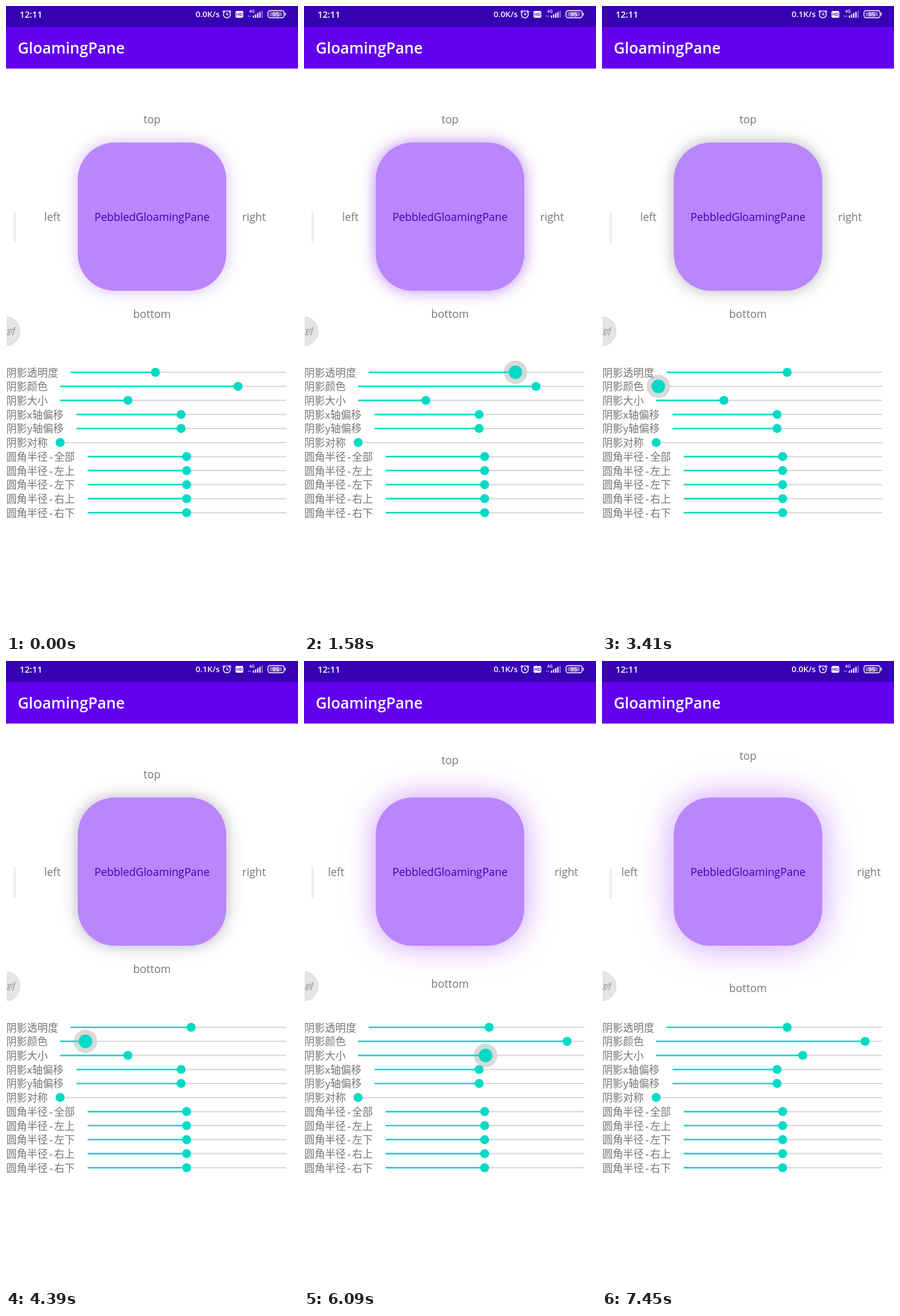
An HTML page for the animation above (8 s loop, 472x1015 px).

```html
<!DOCTYPE html>
<html lang="zh">
<head>
<meta charset="utf-8">
<style>
html, body { margin: 0; width: 100%; height: 100%; overflow: hidden; background: #fff; }
#box { position: absolute; left: 116px; top: 221px; width: 240px; height: 240px; border-radius: 60px; background: #bb86fc; }
svg { position: absolute; left: 0; top: 0; font-family: "Open Sans", "Noto Sans CJK SC", "Noto Sans CJK", sans-serif; }
.side { font-size: 17.6px; fill: #777; text-anchor: middle; }
.row { font: 16.8px "Noto Sans CJK SC", "Noto Sans CJK", sans-serif; fill: #757575; }
.dash { font-family: "DejaVu Sans Mono", monospace; }
.status { fill: #fff; font-weight: 600; }
.line { fill: none; stroke: #fff; stroke-width: 1.4; }
</style>
</head>
<body>
<div id="box"></div>
<svg width="472" height="1015" viewBox="0 0 472 1015">
  <rect width="472" height="34" fill="#3700b3"/>
  <rect y="34" width="472" height="67.3" fill="#6200ee"/>
  <g class="status">
    <text x="22" y="18.5" font-size="14.3">12:11</text>
    <text id="speed" x="345.5" y="18" font-size="13.3" text-anchor="end"></text>
    <g class="line">
      <circle cx="357" cy="13.5" r="5.6"/>
      <path d="M357 10.5v3.5h2.6M350 10l3.2-3M364 10l-3.2-3"/>
      <rect x="423.5" y="7.5" width="26" height="11.5" rx="3.5"/>
      <path d="M451.5 11v4.5"/>
    </g>
    <rect x="371" y="8" width="12.5" height="11" rx="2"/>
    <text x="377.2" y="16.4" font-size="7.5" text-anchor="middle" fill="#3700b3">HD</text>
    <text x="393" y="11" font-size="7">4G</text>
    <path d="M391 15.5h2l-1 3zM394 17.5h2l-1-3z" opacity=".7"/>
    <g id="signal"></g>
    <rect x="426" y="9.7" width="20" height="7" rx="1.5" opacity=".4"/>
    <text x="436.3" y="16.6" font-size="9.5" text-anchor="middle">95</text>
  </g>
  <text x="19" y="76.5" font-size="24.6" font-weight="600" fill="#fff">GloamingPane</text>
  <text x="236" y="348" font-size="17.5" text-anchor="middle" fill="#3700b3">PebbledGloamingPane</text>
  <g class="side">
    <text id="top" x="236">top</text>
    <text id="left" y="348">left</text>
    <text id="right" y="348">right</text>
    <text id="bottom" x="236">bottom</text>
  </g>
  <rect x="12" y="333" width="4" height="51" rx="2" fill="#eee"/>
  <path d="M2 503a23.7 23.7 0 0 1 0 47z" fill="#e6e4e6" stroke="#d8d6d8"/>
  <text x="2" y="530" font-size="12" font-style="italic" fill="#888">gif</text>
  <g id="rows"></g>
</svg>
<script>
const $ = id => document.getElementById(id);

for (let i = 0; i < 5; i++) {
  const h = 3.5 + 2 * i;
  $("signal").innerHTML += `<rect x="${399 + 3.5 * i}" y="${19 - h}" width="2" height="${h}" opacity="${i < 4 ? 1 : 0.4}"/>`;
}

// Slider rows: label, track start, thumb position
const rows = [
  ["阴影透明度", 104.5, 241.5], ["阴影颜色", 87.5, 375], ["阴影大小", 87.5, 197],
  ["阴影x轴偏移", 114, 283], ["阴影y轴偏移", 114, 283], ["阴影对称", 87.5, 87.5],
  ...["全部", "左上", "左下", "右上", "右下"].map(s => ["圆角半径-" + s, 132, 292])
];
const END = 453;

$("rows").innerHTML = rows.map(([label, x0, x], i) => {
  const y = 593 + 22.73 * i;
  const text = label.replace("-", '<tspan class="dash">-</tspan>');
  return `<circle class="halo" cx="${x}" cy="${y}" r="19" opacity="0"/>
    <text class="row" x="0.5" y="${y + 6.5}">${text}</text>
    <path d="M${x0} ${y}H${END}" stroke="#d8d6d8" stroke-width="2"/>
    <line x1="${x0}" x2="${x}" y1="${y}" y2="${y}" stroke="#03dac5" stroke-width="2.5"/>
    <circle class="thumb" cx="${x}" cy="${y}" r="7.3" fill="#03dac5"/>`;
}).join("");

const all = s => [...$("rows").querySelectorAll(s)];
const halos = all(".halo"), fills = all("line"), thumbs = all(".thumb");

// Drags of the first three sliders: finger down, finger up, glides as [start, end, x]
const drags = [
  { down: 450, up: 2200, glides: [[450, 1180, 364], [1280, 1970, 299.3]] },
  { down: 2430, up: 5420, glides: [[2380, 2420, 396.5], [2430, 3220, 363], [3220, 3390, 91],
    [3570, 3930, 406], [3930, 4340, 128.5], [4390, 4960, 425.3]] },
  { down: 5420, up: 7450, glides: [[5340, 5420, 190], [5620, 6090, 293.5], [6480, 7180, 324.5]] }
];

const clamp = v => Math.min(1, Math.max(0, v));
const ease = v => v * v * (3 - 2 * v);

function drag(i, t) {
  const { down, up, glides } = drags[i];
  const x = glides.reduce((x, [a, b, to]) => x + (to - x) * ease(clamp((t - a) / (b - a))), rows[i][2]);
  const press = clamp((t - down) / 150) * clamp((up - t) / 150);
  halos[i].setAttribute("cx", x);
  halos[i].setAttribute("opacity", 0.15 * press);
  fills[i].setAttribute("x2", x);
  thumbs[i].setAttribute("cx", x);
  thumbs[i].setAttribute("r", 7.3 + 3.7 * press);
  return (x - rows[i][1]) / (END - rows[i][1]);
}

function draw(now) {
  // The screen refreshes about ten times a second
  const t = Math.round(now % 8000 / 97) * 97;
  const [alpha, tint, level] = drags.map((_, i) => drag(i, t));

  // The shadow goes from grey to violet along the colour slider
  const size = 87.4 * level;
  const rgb = [120 + 45 * tint, 122 - 55 * tint, 125 + 130 * tint].map(Math.round);
  $("box").style.boxShadow = `0 0 ${0.95 * size + 1}px rgba(${rgb},${alpha})`;

  const shift = size - 26.2;
  $("top").setAttribute("y", 190 - shift);
  $("bottom").setAttribute("y", 505.5 + shift);
  $("left").setAttribute("x", 75 - shift);
  $("right").setAttribute("x", 401 + shift);
  $("speed").textContent = t > 1700 && t < 6250 ? "0.1K/s" : "0.0K/s";
  requestAnimationFrame(draw);
}
requestAnimationFrame(draw);
</script>
</body>
</html>
```
